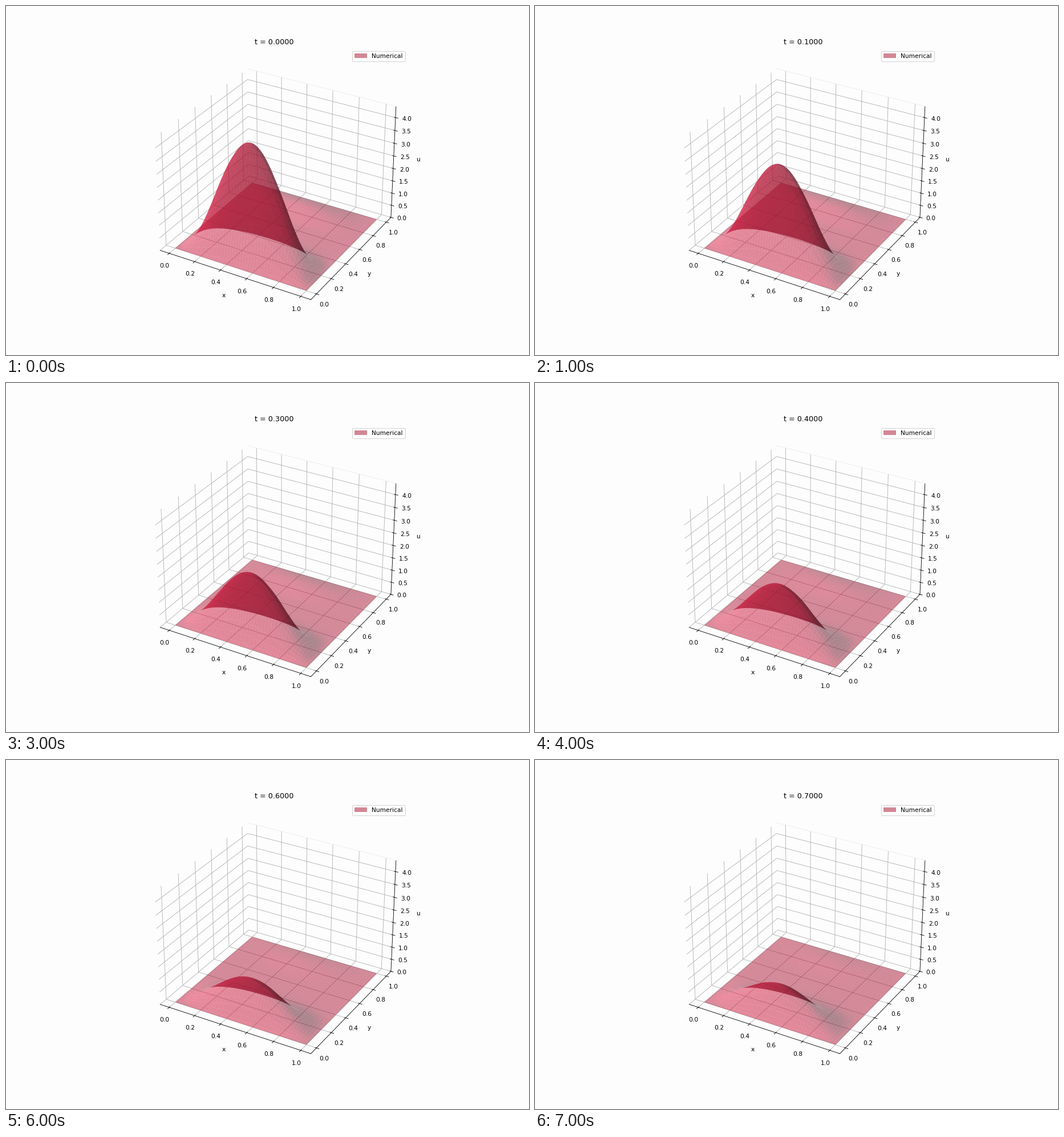
A matplotlib script that plays this animation: 917x611 px, repeating every 8 s.

```python
import numpy as np
import matplotlib.pyplot as plt
from matplotlib.animation import FuncAnimation

WIDTH, HEIGHT, DPI = 917, 611, 76.4
FRAMES, INTERVAL = 8, 1000
DT = 0.1
PEAK, CREST_Y, Z_TOP = 4.45, 0.156, 4.43

grid = np.linspace(0, 1, 50)
X, Y = np.meshgrid(grid, grid)


def profile(x, y):
    """Initial state: a tall hump near y = 0 and a low ridge near y = 1."""
    across = np.clip(np.sin(np.pi * x), 0, 1) ** 1.8
    s = y / CREST_Y
    hump = PEAK * (s * np.exp(0.5 - s**2 / 2)) ** 2.2
    ridge = 22 * np.clip(y - 0.65, 0, None) ** 2 * (1 - y)
    return across * (hump + ridge)


U0 = profile(X, Y)

fig = plt.figure(figsize=(WIDTH / DPI, HEIGHT / DPI), dpi=DPI,
                 facecolor="#fdfdfd")
ax = fig.add_subplot(projection="3d", facecolor="none")
ax.set(xlabel="x", ylabel="y", zlabel="u", zlim=(0, Z_TOP))
for axis in (ax.xaxis, ax.yaxis, ax.zaxis):
    axis.set_pane_color((1, 1, 1, 0))


def draw_surface(t):
    return ax.plot_surface(X, Y, U0 * np.exp(-2 * t), color="crimson",
                           alpha=0.5, label="Numerical")


surface = draw_surface(0)
ax.legend(loc="upper right")

# Faint upper rim of the back wall
x_lim, y_lim = ax.get_xlim(), ax.get_ylim()
ax.autoscale(False)
ax.plot(x_lim, [y_lim[1]] * 2, [Z_TOP] * 2, color="#ececec", lw=0.8)


def update(i):
    global surface
    surface.remove()
    surface = draw_surface(i * DT)
    ax.set_title(f"t = {i * DT:.4f}")
    return [surface]


anim = FuncAnimation(fig, update, frames=FRAMES, interval=INTERVAL,
                     repeat=True, repeat_delay=0, blit=False)
plt.show()
```
